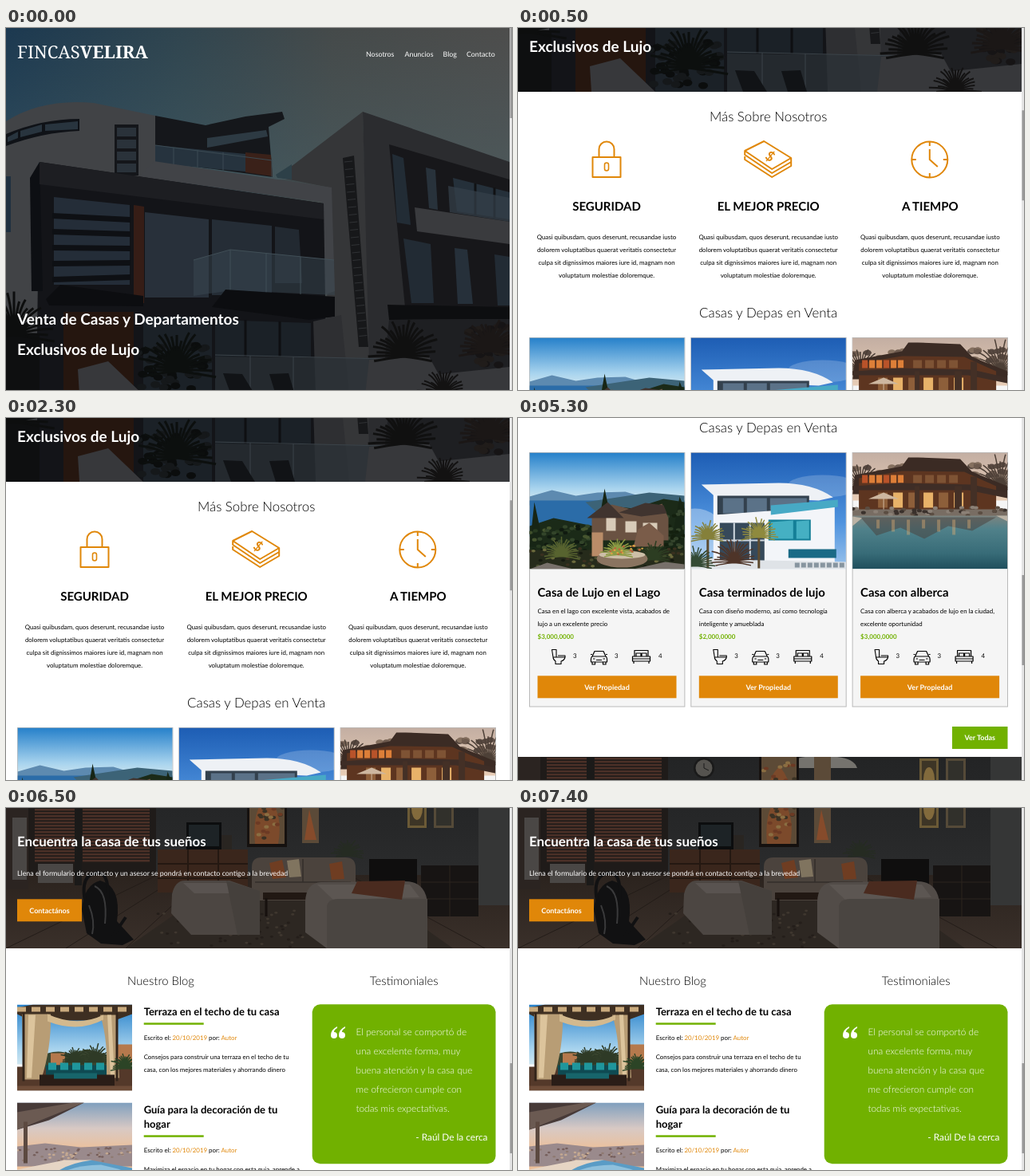
An HTML page for the animation above (8000 ms loop, 634 px wide and 454 px high).

```html
<!DOCTYPE html>
<html lang="es">
<head>
<meta charset="utf-8">
<style>
  html, body { margin: 0; width: 100%; height: 100%; overflow: hidden; background: #fff; }
  svg { display: block; }
  text { font-family: Lato, sans-serif; text-rendering: geometricPrecision; white-space: pre; }
</style>
</head>
<body>
<svg id="stage" width="634" height="454" viewBox="0 0 634 454"></svg>
<script>
const ORANGE = '#e08709', GREEN = '#71b100';
const BODY = 7.88, LEAD = 8.86, QUOTE = 11.82, HEADING = 16.85, SUBHEADING = 14.85;

// Drawing helpers, each returns SVG markup
const path = (fill, d, extra = '') => `<path fill="${fill}" d="${d}" ${extra}/>`;
const poly = (fill, points, extra = '') => `<polygon fill="${fill}" points="${points}" ${extra}/>`;
const rect = (fill, x, y, w, h, extra = '') =>
  `<rect fill="${fill}" x="${x}" y="${y}" width="${w}" height="${h}" ${extra}/>`;
const oval = (fill, x, y, rx, ry = rx) => `<ellipse fill="${fill}" cx="${x}" cy="${y}" rx="${rx}" ry="${ry}"/>`;
const line = (color, width, d) =>
  `<path fill="none" stroke="${color}" stroke-width="${width}" stroke-linejoin="round" d="${d}"/>`;
const text = (x, y, str, size, { weight = 400, fill = '#000', anchor = 'start', extra = '' } = {}) =>
  `<text x="${x}" y="${y}" font-size="${size}" font-weight="${weight}" fill="${fill}" text-anchor="${anchor}" ${extra}>${str}</text>`;
const lines = (x, y, step, list, size, style) => list.map((s, i) => text(x, y + i * step, s, size, style)).join('');
const at = (x, y, content) => `<g transform="translate(${x} ${y})">${content}</g>`;
const framed = (x, y, w, h, content) => `<svg x="${x}" y="${y}" width="${w}" height="${h}">${content}</svg>`;
const gradient = (id, stops, dir = 'x2="0" y2="1"') =>
  `<linearGradient id="${id}" ${dir}>` +
  stops.map(([o, c]) => `<stop offset="${o}" stop-color="${c}"/>`).join('') + '</linearGradient>';
const repeat = (n, fn) => Array.from({ length: n }, (_, i) => fn(i)).join('');
const noise = n => { const v = Math.sin(n * 127.1) * 43758.5; return v - Math.floor(v); };
const specks = (n, colors, x, y, w, h, r = 2) => repeat(n, i =>
  oval(colors[i % colors.length], (x + noise(i + 1) * w).toFixed(1), (y + noise(i + 500) * h).toFixed(1), r, r * .7));
const plant = (x, y, r, color, width = 1.5) => line(color, width, repeat(23, i => {
  const a = Math.PI * (1.05 - 1.1 * i / 22), len = r * (.65 + .35 * noise(i + r));
  const dx = Math.cos(a) * len, dy = -Math.sin(a) * len;
  return `M${x} ${y}q${dx * .5} ${dy * .7 - 2} ${dx} ${dy}`;
}));

const button = (x, y, w, label, color = ORANGE) =>
  rect(color, x, y, w, 28) + text(x + w / 2, y + 17.3, label, 9, { weight: 700, fill: '#fff', anchor: 'middle' });

const defs = '<defs>' +
  gradient('dusk', [[0, '#1c3950'], [.35, '#30454f'], [.65, '#454a4a'], [1, '#4d4d4c']], '') +
  gradient('haze', [[0, '#4b656c00'], [1, '#4b656c70']]) +
  gradient('lakeSky', [[0, '#2580ca'], [.75, '#a9d4ee'], [1, '#cfe6f0']]) +
  gradient('blueSky', [[0, '#1d5db4'], [.6, '#4f93de'], [1, '#9cc4ec']]) +
  gradient('pinkSky', [[0, '#c3aea2'], [1, '#e8cdb6']]) +
  gradient('pool', [[0, '#7d8480'], [.25, '#50818a'], [.7, '#386c78'], [1, '#1f4e5c']]) +
  gradient('sunset', [[0, '#7f9fbe'], [.3, '#d8c9c4'], [.55, '#ecc09a']]) +
  gradient('wall', [[0, '#232425'], [1, '#2c2d2e']]) +
  gradient('floor', [[0, '#2b231e'], [1, '#3a302a']]) + '</defs>';

const heroPhoto = rect('url(#dusk)', 0, 0, 631, 460) + rect('url(#haze)', 0, 0, 631, 190) +
  // curved wing on the left
  path('#414346', 'M0 117Q45 88 110 94L187 110V190L40 170V460H0Z') +
  path('#0f1217', 'M0 133Q45 114 92 114V129Q45 131 0 148Z') +
  path('#28343e', 'M2 137L15 130V138L2 143ZM18 129L45 121V130L18 137ZM49 121L90 117V127L49 129Z') +
  rect('#14161a', 136, 121, 30, 64) + repeat(4, i => rect('#2a323a', 139, 125 + i * 15, 24, 11)) +
  rect('#1f3040', 0, 186, 6, 70) +
  // roof terrace
  poly('#15171b', '187,110 250,122 300,111 346,105 349,114 329,124 334,187 187,167') +
  poly('#2d3a43', '252,138 326,128 328,136 252,150') +
  poly('#26333e', '187,147 300,158 300,180 187,170') + poly('#3a2119', '300,156 332,159 334,186 300,181') +
  line('#3b4a53', 1, 'M187 147L333 166M210 150V172M240 153V176M272 156V180M333 166V187') +
  // right building
  poly('#353638', '340,187 447,105 458,460 400,460 405,200') +
  poly('#2d4048', '338,184 358,171 358,190 340,188') +
  poly('#2b2c2f', '447,105 631,168 631,460 456,460') +
  poly('#17181a', '422,163 436,160 454,400 442,400') +
  repeat(24, i => line('#303235', 1, `M${424 + i * .8} ${168 + i * 9.5}l10 -1`)) +
  poly('#17171a', '480,146 631,190 631,350 500,350') +
  poly('#222c35', '484,158 498,163 507,247 490,244') + poly('#28323b', '526,175 538,178 541,228 530,226') +
  poly('#25303a', '560,188 631,206 631,240 565,230') + line('#111214', 3, 'M588 195V236M612 200V240') +
  poly('#36414a', '554,198 631,213 631,243 556,231', 'opacity=".7"') +
  poly('#3a3b3e', '512,225 631,243 631,271 515,255') +
  poly('#222b34', '498,264 532,271 536,345 508,345') + poly('#26303a', '562,276 578,278 585,346 566,346') +
  poly('#222b34', '612,284 631,287 631,348 616,348') +
  poly('#0d0e10', '478,347 631,350 631,365 480,366') + poly('#1e1f22', '480,366 631,365 631,460 470,460') +
  // main dark frame
  poly('#414347', '167,187 185,167 408,200 412,330 400,334 396,218') +
  poly('#131418', '42,168 398,220 402,460 38,460') + poly('#0d0f13', '30,188 42,168 46,330 32,330') +
  poly('#1d1e22', '42,168 398,220 398,240 42,196') +
  poly('#242d38', '60,212 155,222 155,322 60,322') +
  repeat(5, i => poly('#0e1014', `58,${232 + i * 20} 156,${237 + i * 18} 156,${244 + i * 18} 58,${239 + i * 20}`)) +
  poly('#361d16', '160,222 173,224 173,345 160,345') +
  poly('#28303a', '174,231 254,240 254,338 174,338') + poly('#252d36', '258,240 333,248 333,335 258,335') +
  poly('#222931', '337,249 367,253 371,320 337,320') +
  poly('#3a4952', '235,291 282,278 411,291 412,335 282,329 235,336', 'opacity=".5"') +
  line('#414f57', 1, 'M281 278V330M326 283V332M369 287V334M235 291L281 278L411 291') +
  poly('#0c0d10', '50,340 68,322 172,336 172,349 54,348') + poly('#0c0d10', '258,350 275,328 412,337 412,362 380,366') +
  poly('#25160f', '72,356 160,356 160,460 72,460') + poly('#1b2127', '172,362 258,362 258,460 172,460') +
  poly('#1b2127', '262,366 382,370 382,412 262,412') + line('#0e0f12', 3, 'M300 366V412M343 368V412') +
  poly('#2e2f32', '385,368 420,360 430,460 388,460') +
  poly('#2b3238', '262,412 460,414 480,460 262,460', 'opacity=".7"') + line('#3b4349', 1, 'M262 410L520 416M306 411V460M360 412V460') +
  path('#111316', 'M272 433L296 434L312 460H282ZM330 434L354 433L362 460H338Z') +
  path('#37383b', 'M90 428L128 418L172 460H92ZM455 416L530 412L556 460H450ZM545 434L631 425V460H555Z') +
  rect('#0e0f10', 0, 385, 42, 75) + specks(60, ['#0b0d0d', '#15181a'], 165, 395, 90, 60, 6) +
  specks(50, ['#161415', '#201c1a'], 580, 370, 50, 55, 6) +
  plant(10, 385, 55, '#0d0e0e', 3) + plant(214, 430, 52, '#0c0f0e', 3) +
  plant(498, 412, 48, '#101010', 3) + plant(606, 405, 42, '#1b1716', 3) + plant(548, 460, 34, '#131212', 2);

const hero = framed(0, 0, 631, 460, heroPhoto) +
  `<text x="14" y="37.7" font-size="22" fill="#fff" style="font-family:'Noto Serif',serif;font-weight:300">FINCAS<tspan font-weight="700">VELIRA</tspan></text>` +
  [[451, 'Nosotros'], [499.5, 'Anuncios'], [547.5, 'Blog'], [577, 'Contacto']]
    .map(([x, s]) => text(x, 35.5, s, LEAD, { fill: '#fff' })).join('') +
  lines(14, 372, 38, ['Venta de Casas y Departamentos', 'Exclusivos de Lujo'], 19, { weight: 700, fill: '#fff' });

const lock = line(ORANGE, 2, 'M-17 -3H18V22H-17ZM-9 -3V-13A9.5 9.5 0 0 1 10 -13V-3') +
  `<rect x="-2" y="4" width="5" height="10" rx="2.5" fill="none" stroke="${ORANGE}" stroke-width="1.6"/>`;
const money = line(ORANGE, 2, 'M-29 -11L-5 -23L29 -2L5 12ZM-29 -11V-6L5 17L29 3V-2M-29 -4V0L5 22L29 8V3') +
  text(0, 1, '$', 17, { weight: 700, fill: ORANGE, anchor: 'middle', extra: 'transform="rotate(35)"' });
const clock = `<circle r="22.5" fill="none" stroke="${ORANGE}" stroke-width="2"/>` +
  line(ORANGE, 2, 'M0 -22V-17M0 17V22M-22 0H-17M17 0H22M0 -13V0L10 9');

const feature = ([x, icon, title]) => at(x - .5, 545, icon) +
  text(x, 609.4, title, 15, { weight: 700, anchor: 'middle' }) +
  lines(x, 644.6, 16, ['Quasi quibusdam, quos deserunt, recusandae iusto', 'dolorem voluptatibus quaerat veritatis consectetur',
    'culpa sit dignissimos maiores iure id, magnam non', 'voluptatum molestiae doloremque.'], BODY, { anchor: 'middle' });

const lakeHouse = rect('url(#lakeSky)', 0, 0, 194, 60) +
  path('#5d8ab0', 'M0 55L28 47L58 54L85 50L120 49L150 58V66H0Z') + rect('#2b6ca8', 0, 60, 194, 45) +
  path('#3c6377', 'M70 62L110 56L150 50L194 54V80H90Z') +
  path('#1b2a18', 'M0 92L30 82L80 92L96 66L130 70L168 58L194 62V146H0Z') +
  path('#172515', 'M86 92L94 45L104 92ZM0 118L6 62L18 118ZM176 120L188 55L194 70V146H176Z') +
  specks(90, ['#101a10', '#33452a', '#283a20', '#46552f'], 0, 90, 75, 50, 3) +
  specks(40, ['#14200f', '#33432b'], 165, 70, 30, 70, 3) +
  path('#6a5242', 'M78 80L103 65L140 74L166 64L174 82V110H78Z') +
  path('#40342f', 'M72 82L98 62L118 82ZM112 75L145 63L168 66L172 76L140 80Z') +
  path('#d8cbb8', 'M96 82H108V98H96ZM120 86H134V100H120ZM142 88H160V98H142Z') +
  path('#7a5c49', 'M136 96L150 88L168 104V118H130Z') + rect('#262b1b', 0, 122, 194, 24) +
  specks(80, ['#161a10', '#4a4f30', '#6b6a3c', '#39301f'], 0, 118, 194, 26, 2.5) +
  plant(40, 130, 25, '#57632f') + plant(155, 134, 24, '#2c3d22') +
  path('#b98c68', 'M78 100H92V130H78Z') + oval('#8a7460', 116, 133, 32, 11) + oval('#cdbfa8', 116, 128, 29, 5) +
  plant(110, 128, 22, '#8b9a44') + specks(22, ['#c65b3c', '#d8a545'], 90, 116, 52, 12, 1.5) +
  path('#77706a', 'M0 146L22 138L55 146ZM130 146L170 137L194 140V146Z');

const modernHouse = rect('url(#blueSky)', 0, 0, 194, 146) +
  oval('#ffffff30', 165, 42, 45, 14) + oval('#ffffff55', 5, 100, 35, 30) +
  path('#eef1f5', 'M13 40L110 38Q152 38 178 56L160 60L30 55Z') + path('#33414e', 'M30 54H148V80H30Z') +
  path('#5b7288', 'M40 57H66V76H40ZM70 57H95V76H70ZM99 57H145V72H99Z') +
  path('#f3f5f9', 'M28 52H33V146H28ZM30 78L180 67V145H30Z') +
  path('#36495a', 'M36 88H92V138H36Z') + line('#cfd8e0', 2, 'M36 110H92M54 88V138M74 88V138') +
  path('#147f97', 'M97 84H150V110H97Z') + path('#45b0c3', 'M100 87L128 85V108H100ZM132 86L148 85V108H132Z') +
  path('#47a9c5', 'M100 66L184 59V68L100 78Z') + path('#1a6a86', 'M122 121H182V132H122Z') +
  path('#dfe3e7', 'M0 130L40 134L194 137V146H0Z') + repeat(8, i => rect('#8795a0', 130 + i * 8, 138, 6, 6)) +
  line('#5d4b30', 3, 'M21 105V145M85 103V145') + plant(21, 108, 24, '#85803a') + plant(85, 106, 26, '#8f8a3e') +
  plant(54, 138, 32, '#4e3428') + plant(6, 142, 26, '#334a35');

const poolHouse = rect('url(#pinkSky)', 0, 0, 194, 60) +
  specks(70, ['#6d5a4e', '#85705f', '#574840'], 0, 14, 194, 30, 5) + plant(10, 45, 34, '#493d35') + plant(185, 45, 45, '#4d4037') +
  path('#3b2b24', 'M3 28L62 17L70 6H82L135 8L150 24L194 42V52H0Z') + path('#5d3520', 'M8 32L62 23L140 24L180 42V78H8Z') +
  repeat(6, i => rect(i % 3 ? '#dd7f38' : '#b9532a', 12 + i * 9, 28, 7, 10)) +
  repeat(4, i => rect('#7e5334', 76 + i * 15, 28, 11, 10)) +
  repeat(6, i => rect(i % 2 ? '#e8b269' : '#8d5f3a', 32 + i * 19, 50, 12, 19)) + path('#3e2d26', 'M0 42L60 38L150 40L194 50V57L145 47H0Z') +
  path('#443026', 'M78 42H84V76H78ZM128 42H137V76H128ZM148 30H156V76H148Z') + path('#cdb7a0', 'M20 58L39 50L58 58Z') +
  line('#cfb89e', 1, 'M39 56V75') + rect('#786d63', 0, 71, 194, 10) +
  specks(40, ['#3a312c', '#8b8076', '#5b4d42'], 0, 68, 194, 11, 3) +
  rect('url(#pool)', 0, 79, 194, 67) + path('#4a423e88', 'M10 81H180L150 98L120 92L90 108L60 94L30 104Z') +
  repeat(7, i => rect('#e5ae72', 30 + i * 19, 84, 4, 11 + i % 3 * 4, 'opacity=".4"')) +
  path('#bcb3a5', 'M0 80L12 82L0 92ZM180 79H194V86Z');

const toilet = line('#000', 1.1, 'M.5 .5H6V10H2ZM2 10H17Q16 14 12 15V18.5H5V15Q2 13 2 10M8 8H17V10');
const car = line('#000', 1.2, 'M2 8L5 1.5H16L19 8ZM2 8Q0 9 .5 15H20.5Q21 9 19 8M2 15V18H5.5V15M15.5 15V18H19V15M7 12.5H14M0 5.5H2M19 5.5H21M3 11H5.5M15.5 11H18');
const bed = line('#000', 1.2, 'M3 9V1.5H20V9M5 9V5H11V9M12 9V5H18V9M.5 9H22.5V15H.5ZM.5 12H22.5M2 15V18M21 15V18');

const card = ({ photo, title, about, price }, i) => at(14 + i * 202.3, 768,
  rect('#f5f5f5', .5, .5, 194.4, 318.5, 'stroke="#b9b9b9"') + framed(.5, .5, 194.4, 145.7, photo) +
  text(10.5, 181.2, title, 14.9, { weight: 700 }) + lines(10.5, 202, 16, about, BODY) +
  text(10.5, 234, price, 8, { weight: 700, fill: GREEN }) +
  at(28, 247, toilet) + at(77, 248, car) + at(129, 247, bed) +
  [[55, 3], [107, 3], [162, 4]].map(([x, n]) => text(x, 258, n, BODY)).join('') +
  button(10.5, 280.3, 174, 'Ver Propiedad'));

const cards = [
  { photo: lakeHouse, title: 'Casa de Lujo en el Lago', about: ['Casa en el lago con excelente vista, acabados de', 'lujo a un excelente precio'], price: '$3,000,0000' },
  { photo: modernHouse, title: 'Casa terminados de lujo', about: ['Casa con diseño moderno, así como tecnología', 'inteligente y amueblada'], price: '$2,000,0000' },
  { photo: poolHouse, title: 'Casa con alberca', about: ['Casa con alberca y acabados de lujo en la ciudad,', 'excelente oportunidad'], price: '$3,000,0000' },
];

const livingRoom = rect('url(#wall)', 0, 0, 631, 130) + rect('url(#floor)', 0, 112, 631, 93) +
  repeat(9, i => line('#231c18', 1, `M${i * 75} 204L${190 + i * 30} 112`)) +
  rect('#353636', 592, 0, 39, 150) + rect('#1f1b19', 0, 0, 188, 112) +
  repeat(24, i => rect('#4b3027', 36, 1 + i * 4, 50, 2.4) + rect('#4b3027', 96, 1 + i * 4, 84, 2.4)) +
  path('#2b2421', 'M0 0H28V130H0Z') + path('#4a4745', 'M8 40H26V118H8ZM40 98H84V122H40Z') + rect('#1b1a19', 86, 0, 9, 125) +
  oval('#1a1a1a', 233, 14, 13) + oval('#55534f', 233, 14, 10.5) + line('#1a1a1a', 1, 'M233 8V14L239 17') +
  path('#75736e', 'M335 14Q340 2 360 0H400Q421 2 425 14Z') +
  rect('#15110f', 302, 0, 50, 77) + rect('#5c4a36', 305, 0, 44, 73) + path('#7c4a2b', 'M312 73Q308 28 328 12Q348 36 341 73Z') +
  specks(30, ['#3b3224', '#8a6e42', '#6c3a24'], 307, 4, 40, 66, 3) +
  rect('#5b4a38', 371, 0, 21, 72) + path('#864b2b', 'M374 68L380 30L389 68Z') +
  rect('#6b5a36', 503, 2, 24, 51) + rect('#3d3526', 506, 5, 18, 45) + oval('#826a3c', 515, 28, 7, 15) +
  rect('#554a38', 536, 2, 25, 51) + rect('#31302b', 539, 5, 19, 45) +
  rect('#0c0d0e', 226, 46, 44, 34) + rect('#1d2326', 229, 49, 38, 27) +
  rect('#3a261c', 190, 80, 113, 54) + line('#241811', 2, 'M190 98H303M190 116H303M228 80V134M266 80V134') +
  rect('#292521', 270, 62, 13, 18) + plant(428, 88, 22, '#252b22') +
  path('#0f0e0e', 'M455 92H515V126H455Z') + path('#171413', 'M520 100H592V164H520Z') + line('#2c241f', 1, 'M520 121H592M520 142H592M556 100V164') +
  path('#2d2722', 'M150 204L235 145L470 140L560 204Z') + specks(110, ['#3f372f', '#241e1a'], 190, 150, 320, 52, 2) +
  path('#4b433d', 'M308 102Q308 90 320 90H425Q438 90 438 103V144H308Z') + line('#332e2a', 1.5, 'M312 121H432M372 92V121') +
  path('#6f3d22', 'M330 97L346 93L351 115L334 117ZM405 98L421 95L424 117L408 118Z') +
  path('#80745f', 'M352 94L367 92L370 114L355 115Z') +
  rect('#211813', 322, 134, 80, 9) + line('#17110e', 3, 'M326 141V164M398 141V164') +
  path('#4c4642', 'M208 136Q212 119 224 119H280L318 132V187H232L207 160Z') + path('#595350', 'M222 122H276L310 135H236Z') +
  path('#45403c', 'M276 119L318 132V187H290Z') +
  path('#524c48', 'M375 145Q376 122 395 121L500 120Q526 120 528 148V204H402L375 184Z') + path('#5c5652', 'M390 124H506L518 140L410 143Z') +
  path('#4a4541', 'M402 152Q403 142 416 142H528V204H402Z') + path('#4a2b1f', 'M433 135L440 120L500 119L496 143Z') +
  path('#111112', 'M95 155Q98 124 118 119Q145 126 139 170L160 193L146 200L119 198L101 185Z') +
  line('#111112', 4, 'M104 165Q88 113 112 110Q129 105 128 142M133 190L150 165') + line('#3a3a3b', 2, 'M111 126Q128 133 124 173M104 150Q112 170 108 186');

const contact = framed(0, 1150, 631, 204, livingRoom) +
  text(14, 1226, 'Encuentra la casa de tus sueños', 16.9, { weight: 700, fill: '#fff' }) +
  text(14, 1263, 'Llena el formulario de contacto y un asesor se pondrá en contacto contigo a la brevedad', LEAD, { fill: '#fff' }) +
  button(14, 1292.3, 81, 'Contactános');

const terrace = rect('url(#lakeSky)', 0, 0, 144, 75) + rect('#54392a', 0, 78, 144, 30) +
  path('#3a4630', 'M20 68Q50 54 64 62L88 56L125 66V80H20Z') + path('#b5794d', 'M42 61H60V76H42ZM124 50H144V76H124Z') +
  plant(72, 72, 20, '#2e3a26') + plant(98, 72, 24, '#2e3a26') +
  path('#3e2f22', 'M0 4L20 0H144V12L122 20H16L0 12Z') + repeat(8, i => rect('#c9aa7d', i * 18, 3, 11, 6)) +
  path('#b89d75', 'M6 12H42Q43 55 30 94H9ZM104 13H124L128 92H111Q115 48 104 13Z') +
  path('#dcc49c', 'M14 13H23L18 92H12ZM113 13H118L122 91H117Z') + path('#d3b98e', 'M38 12Q75 29 108 13V19Q76 36 38 21Z') +
  line('#32241a', 3, 'M8 10V96M125 10V96') + path('#0f4a52', 'M36 76H112V92H36Z') +
  repeat(5, i => rect('#1f969c', 39 + i * 15, 73, 10, 9)) + path('#2a1d17', 'M28 88H122V102H28Z') +
  rect('#17656b', 46, 86, 54, 7) + plant(135, 80, 20, '#2c4426') + rect('#6d4c38', 0, 102, 144, 6);

const infinityPool = rect('url(#sunset)', 0, 0, 144, 108) +
  path('#9a8a8c', 'M0 55L35 51L80 56L144 53V80H0Z') +
  specks(60, ['#c5a991', '#765f5c', '#8f7a72'], 0, 56, 144, 18, 1.8) +
  path('#473a38', 'M0 0H84L40 22L0 34Z') + path('#6b5a52', 'M0 12L70 0H84L0 34Z') +
  path('#5c4940', 'M8 24H13V76H8Z') +
  path('#5a9cc6', 'M28 108Q36 78 92 72L144 82V108Z') + path('#8fc0dc', 'M48 92Q70 78 105 78L130 84L80 92Z') +
  path('#e6d5c4', 'M0 84L60 72H94Q46 78 30 108H18Q24 90 0 92Z') + path('#3c7fae', 'M34 108Q60 96 144 96V108Z') +
  path('#7d6a61', 'M0 92Q22 90 18 108H0Z');

const post = (y, photo, title, about) => {
  const drop = (title.length - 1) * 18;
  return framed(14, y, 144, 108, photo) + lines(172.7, y + 13.8, 18, title, 13, { weight: 700 }) +
    rect(GREEN, 172.7, y + 22.8 + drop, 75, 2.5) +
    text(172.7, y + 44.3 + drop,
      `Escrito el: <tspan fill="${ORANGE}">20/10/2019</tspan> por: <tspan fill="${ORANGE}">Autor</tspan>`, BODY) +
    lines(172.7, y + 68.4 + drop, 16, about, BODY);
};

const quoteMark = path('#fff', 'M8 0Q0 4 0 11A4 4 0 1 0 4 7Q4 4 8 2ZM18 0Q10 4 10 11A4 4 0 1 0 14 7Q14 4 18 2Z');
const testimonial = rect(GREEN, 383.7, 1424.3, 229.8, 200, 'rx="10"') + at(407, 1452, quoteMark) +
  lines(438.5, 1463, 24, ['El personal se comportó de', 'una excelente forma, muy', 'buena atención y la casa que',
    'me ofrecieron cumple con', 'todas mis expectativas.'], QUOTE, { weight: 300, fill: '#fff' }) +
  text(603.5, 1595, '- Raúl De la cerca', QUOTE, { fill: '#fff', anchor: 'end' });

const heading = (x, y, str, size) => text(x, y, str, size, { weight: 300, anchor: 'middle' });

const page = hero + heading(313.7, 497.4, 'Más Sobre Nosotros', HEADING) +
  [[111, lock, 'SEGURIDAD'], [313.7, money, 'EL MEJOR PRECIO'], [516.3, clock, 'A TIEMPO']].map(feature).join('') +
  heading(313.7, 743, 'Casas y Depas en Venta', HEADING) + cards.map(card).join('') +
  button(544, 1112, 69.5, 'Ver Todas', GREEN) + contact +
  heading(194, 1400, 'Nuestro Blog', SUBHEADING) + heading(498.7, 1400, 'Testimoniales', SUBHEADING) +
  post(1424.5, terrace, ['Terraza en el techo de tu casa'],
    ['Consejos para construir una terraza en el techo de tu', 'casa, con los mejores materiales y ahorrando dinero']) +
  post(1547.5, infinityPool, ['Guía para la decoración de tu', 'hogar'], ['Maximiza el espacio en tu hogar con esta guia, aprende a']) +
  testimonial;

const stage = document.getElementById('stage');
stage.innerHTML = defs + `<g id="page">${page}</g>` + rect('#e4e4e4', 631, 0, 3, 454) + rect('#9a9a9a', 631.5, 0, 2.5, 113, 'id="thumb"');
const pageGroup = document.getElementById('page'), thumb = document.getElementById('thumb');

// The page jumps between scroll positions: [start ms, scroll top]
const stops = [[0, 0], [500, 380], [3500, 725], [6500, 1178]];
function draw(now) {
  const time = now % 8000;
  const top = stops.filter(([start]) => time >= start).pop()[1];
  pageGroup.setAttribute('transform', `translate(0 ${-top})`);
  thumb.setAttribute('y', top * 0.2717);
  requestAnimationFrame(draw);
}
draw(0);
</script>
</body>
</html>
```
